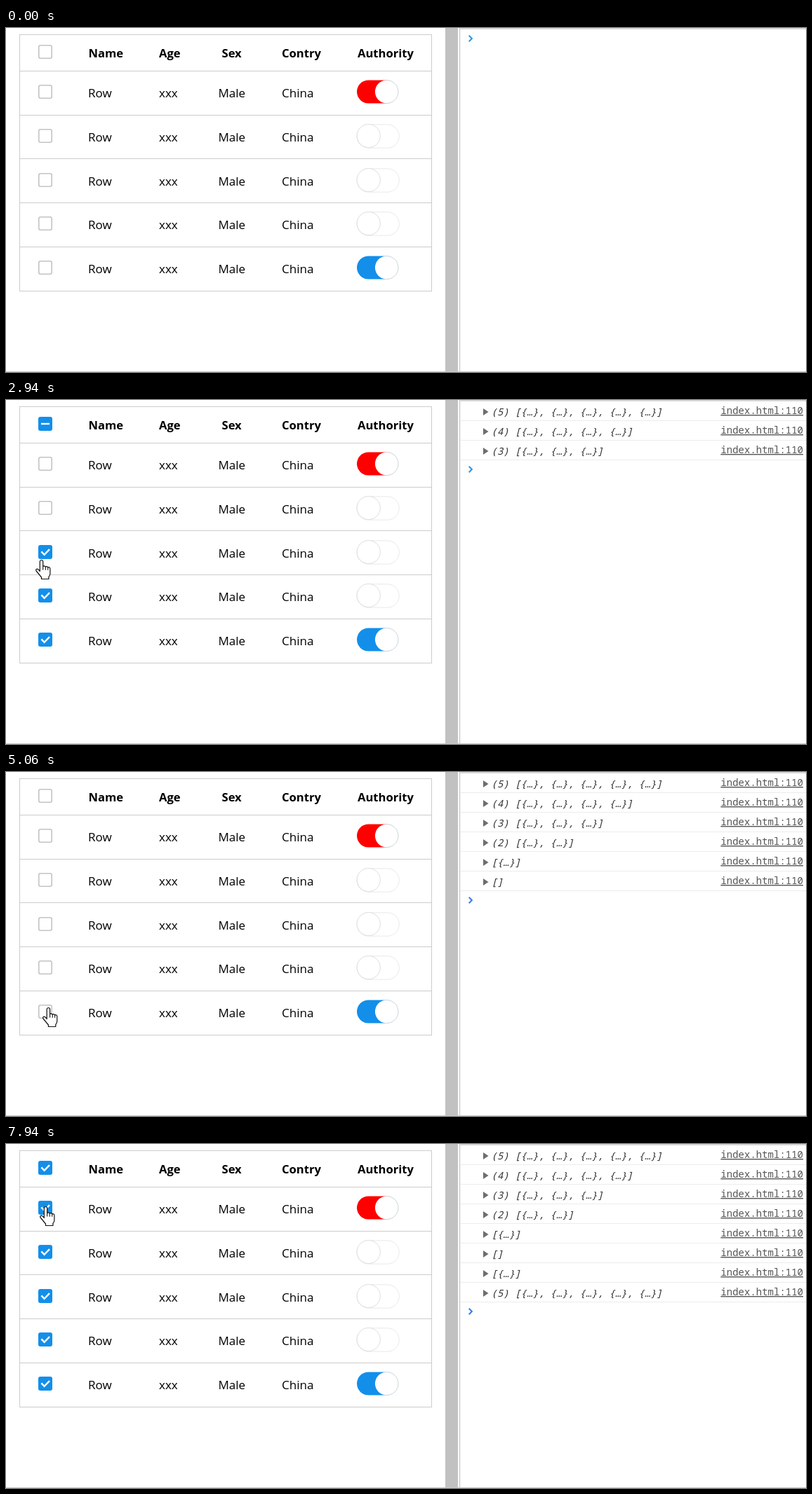
An HTML page that plays this animation: 1140x491 px, repeating every 8 s.

```html
<!DOCTYPE html>
<html lang="en">
<head>
<meta charset="utf-8">
<title>Table selection</title>
<style>
  html, body { margin: 0; width: 100%; height: 100%; overflow: hidden; background: #fff; }
  svg { display: block; }
  .table { font: 17px "Open Sans", "Noto Sans", sans-serif; }
  .head { font-weight: 700; font-size: 16.6px; }
  .log { font: 14px "Noto Sans Mono", "DejaVu Sans Mono", monospace; fill: #333; white-space: pre; }
  .link { fill: #555; text-decoration: underline; }
  .value { font-style: italic; }
</style>
</head>
<body>
<svg width="1140" height="491" viewBox="0 0 1140 491">
  <g id="fixed"></g>
  <g id="live"></g>
</svg>
<script>
const LOOP = 8000, ROWS = 5, FADE = 300;
const PRESS = 150, PRINT_DELAY = 20, LEAVE_DELAY = 70;
const BLUE = '#138fea', BOX_X = 56, HEAD = -1;
const rows = [...Array(ROWS).keys()];
const rowY = i => i === HEAD ? 34 : Math.round(91 + 62.75 * i);

// Where the pointer rests, relative to the box of a row, and when it arrives.
// It moves on shortly after a click, or at the time given by "leave".
const stops = [
  { row: 0, dx: 793, dy: 358, arrive: 0, leave: 70 },
  { row: 0, dx: 27, dy: 4, arrive: 430, leave: 660 },
  { row: HEAD, dx: 4, arrive: 1060, click: 1210 },
  { row: 0, arrive: 1680, click: 2050 },
  { row: 1, arrive: 2550, click: 2710 },
  { row: 2, dx: -4, dy: 13, arrive: 2940, click: 3310 },
  { row: 3, arrive: 3630, click: 3930 },
  { row: 4, dx: 4, arrive: 4190, click: 4630 },
  { row: 4, dx: 6, arrive: 5120, click: 5900 },
  { row: HEAD, dx: 5, dy: -8, arrive: 6600, click: 6815 },
  { row: 0, dx: -15, dy: -16, arrive: 7540, leave: 7710 },
  { row: 0, dx: 2, dy: 0, arrive: 7940, leave: LOOP }
].map(({ row, dx = -1, dy = -4, arrive, click, leave = click + LEAVE_DELAY }) =>
  ({ row, x: BOX_X + dx, y: rowY(row) + dy, arrive, click, leave }));
const clicks = stops.filter(s => s.click);

const line = (d, color, width = 1, extra = '') =>
  `<path d="${d}" fill="none" stroke="${color}" stroke-width="${width}" ${extra}/>`;
const text = (x, y, s, attrs = '') => `<text x="${x}" y="${y}" ${attrs}>${s}</text>`;
const rect = (x, y, w, h, r, attrs) =>
  `<rect x="${x}" y="${y}" width="${w}" height="${h}" rx="${r}" ${attrs}/>`;

function toggle(y, color) {
  const knob = (x, stroke) => `<circle cx="${x}" cy="${y}" r="16.6" fill="#fff" stroke="${stroke}"/>`;
  return color
    ? rect(500, y - 16.5, 58, 33, 16.5, `fill="${color}"`) + knob(542.5, 'none')
      + line(`M542.5 ${y - 16.5}a16.5 16.5 0 0 1 0 33`, '#ccd5d5')
    : rect(500, y - 16.2, 60.3, 33.4, 16.7, 'fill="#fff" stroke="#e9e9e9"') + knob(516.7, '#dedede');
}

function fixedParts() {
  const columns = [['Name', 117.5, 'Row', 117], ['Age', 218, 'xxx', 218], ['Sex', 307.5, 'Male', 302.5],
    ['Contry', 393, 'China', 393], ['Authority', 501]];
  let table = rect(19.5, 9.5, 587, 366, 0, 'fill="none" stroke="#ccc"');
  for (const [head, hx, cell, cx] of columns) {
    table += text(hx, 42, head, 'class="head"');
    if (cell) for (const i of rows) table += text(cx, rowY(i) + 8, cell);
  }
  for (const i of rows) {
    table += line(`M20 ${Math.floor(61.4 + 62.7 * i) + .5}H606`, '#ccc');
    table += toggle(rowY(i), { 0: '#f00', 4: BLUE }[i]);
  }
  return `<g class="table">${table}</g>`
    + rect(626, 0, 18, 491, 0, 'fill="#c1c1c1"')
    + line('M646.5 491V1H1140', '#ccc', 1.5) + line('M0 490.5H1140', '#ccc');
}

// Replays the clicks up to t; each box keeps its value and the time it last changed.
function replay(t) {
  const boxes = rows.map(() => ({ on: false, since: 0 }));
  const head = { count: 0, since: 0 };
  const logs = [];
  for (const { click, row } of clicks) {
    if (click > t) break;
    boxes.forEach((box, i) => {
      if (row === HEAD ? !box.on : row === i) Object.assign(box, { on: !box.on, since: click });
    });
    const count = boxes.filter(box => box.on).length;
    const kind = n => Math.sign(n) + (n === ROWS);
    if (kind(count) !== kind(head.count)) head.since = click;
    head.count = count;
    if (t >= click + PRINT_DELAY) logs.push(count);
  }
  return { boxes, head, logs };
}

const fadeIn = (inner, k) => `<g opacity="${k}">${inner}</g>`;
const filled = rect(-10, -10, 20, 20, 3, `fill="${BLUE}"`);
const empty = rect(-9.2, -9.2, 18.4, 18.4, 2.5, 'fill="#fff" stroke="#c4c4c4" stroke-width="1.6"');
const tick = line('M-5.6 -.6L-1.4 3.8L6 -3.8', '#fff', 2.4);
const dash = line('M-6 0H6', '#fff', 2.4);

function checkboxes({ boxes, head }, t) {
  const box = (row, { on, partial, since }) => {
    const k = Math.min(1, (t - since) / FADE);
    const look = partial ? filled + fadeIn(dash, k)
      : on ? fadeIn(filled + fadeIn(tick, k), k)
      : empty;
    return `<g transform="translate(${BOX_X} ${rowY(row)})">${look}</g>`;
  };
  const on = head.count === ROWS;
  return box(HEAD, { on, partial: head.count > 0 && !on, since: head.since })
    + boxes.map((b, i) => box(i, b)).join('');
}

function consoleLines(logs) {
  const lines = logs.map((n, i) => {
    const y = 28 * i;
    const value = (n > 1 ? `(${n}) ` : '') + `[${Array(n).fill('{…}').join(', ')}]`;
    return `<path d="M680 ${y + 12}l7.5 5l-7.5 5z" fill="#6e6e6e"/>`
      + text(691.5, y + 22, value, 'class="value"')
      + text(1136, y + 20, 'index.html:110', 'class="link" text-anchor="end"')
      + line(`M647 ${Math.floor(29.9 + 27.9 * i) + .5}H1140`, '#ececec');
  }).join('');
  const n = logs.length;
  return `<g class="log">${lines}</g>`
    + line(`M659.7 ${28 * n + 10.8}l4.2 4.2l-4.2 4.2`, n < 4 ? '#2d95e0' : '#367cf1', 2);
}

const hand = `<g transform="translate(-1.5 -1.5)">
  <path d="M-2.2 16V2.2a2.2 2.2 0 0 1 4.4 0V9q2 -1.6 3.6 .6q2 -1 3.4 .7q3 -.6 3.2 2.2V19
  q0 3 -2 5v3H0v-2.5L-7.4 15.5q-1 -2 .6 -2.8q2 -.6 4.6 3.3z"
  fill="#fff" stroke="#111" stroke-width="1.2" stroke-linejoin="round"/>
  ${line('M2.2 9v5M5.8 9.6v4.6M9.2 10.3v4', '#111', 1.1)}</g>`;
const arrow = '<path d="M0 0V16.5L3.8 13L6.4 18.6L8.8 17.5L6.3 12H11.6z" fill="#fff" stroke="#111"/>';

function pointer(t) {
  const next = stops.findIndex(s => s.leave > t);
  if (next < 1) return '';
  const from = stops[next - 1], to = stops[next];
  const k = Math.min(1, (t - from.leave) / (to.arrive - from.leave));
  const ease = k * k * (3 - 2 * k);
  const x = from.x + (to.x - from.x) * ease, y = from.y + (to.y - from.y) * ease;
  const near = (a, b) => Math.abs(a - b) < 14.5;
  const overBox = near(x, BOX_X) && [HEAD, ...rows].some(row => near(y, rowY(row)));
  const pressed = t >= to.click - PRESS && t < to.click;
  const glow = pressed ? '<circle cy="1" r="15.3" fill="#ff0" opacity=".55"/>' : '';
  return `<g transform="translate(${x} ${y})">${glow}${overBox ? hand : arrow}</g>`;
}

const live = document.getElementById('live');
document.getElementById('fixed').innerHTML = fixedParts();

const start = performance.now();
function draw() {
  const t = (performance.now() - start) % LOOP;
  const state = replay(t);
  live.innerHTML = checkboxes(state, t) + consoleLines(state.logs) + pointer(t);
  requestAnimationFrame(draw);
}
draw();
</script>
</body>
</html>
```
